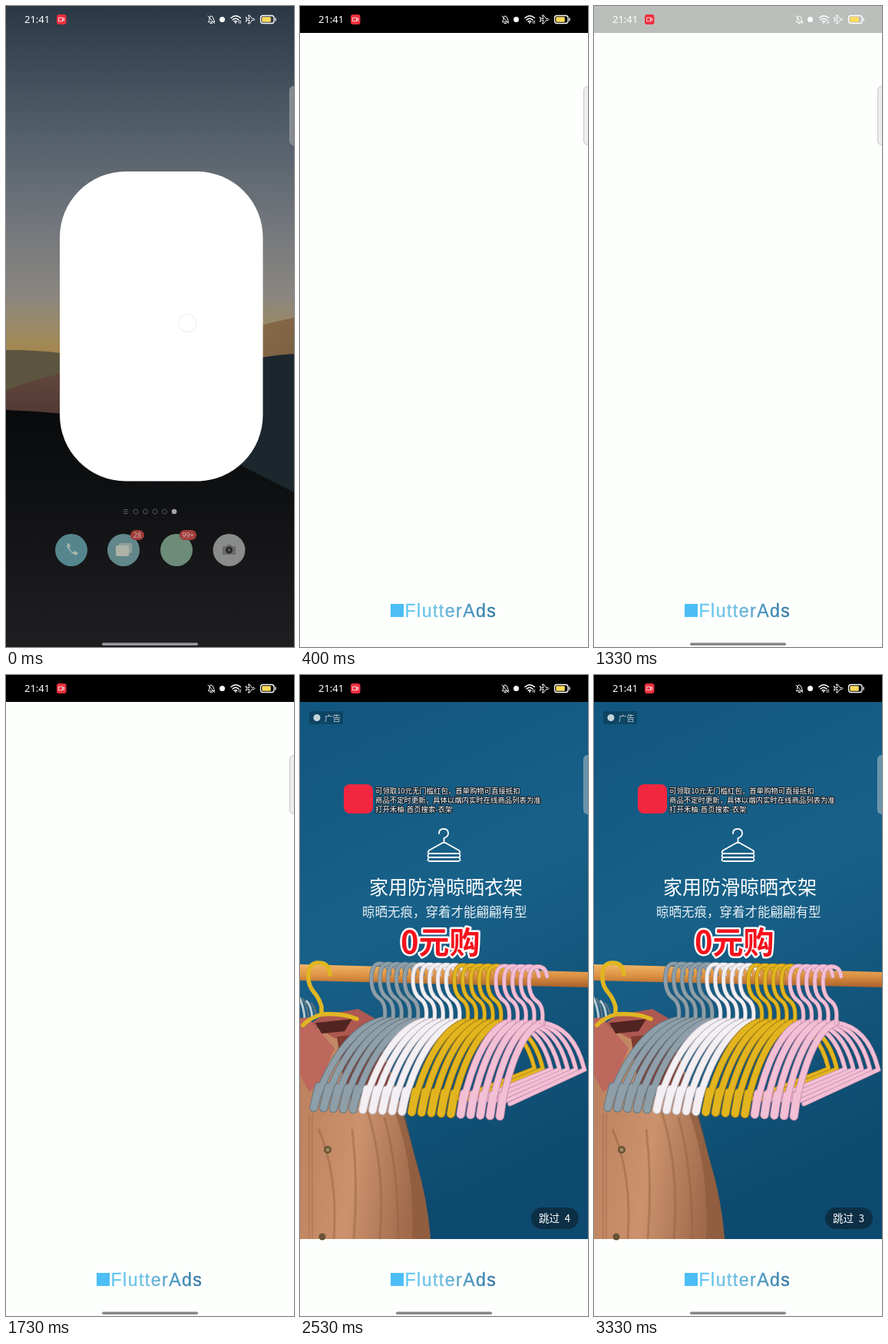
An HTML page for the animation above (3390 ms loop, 375x833 px).

```html
<!DOCTYPE html>
<html lang="zh">
<head>
<meta charset="utf-8">
<title>Splash ad</title>
<style>
html, body { margin: 0; width: 100%; height: 100%; overflow: hidden; background: #000; }
svg { display: block; width: 375px; height: 833px; }
text { font-family: "Noto Sans CJK SC", "Noto Sans", sans-serif; white-space: pre; }
.latin { font-family: "Noto Sans", sans-serif; }
.brand { font: 23px "Liberation Sans", Arial, sans-serif; letter-spacing: 1.5px; }
</style>
</head>
<body>
<svg viewBox="0 0 375 833" xmlns="http://www.w3.org/2000/svg">
<defs>
  <linearGradient id="sky" x2="0" y2="1">
    <stop offset="0" stop-color="#2b3745"/><stop offset=".3" stop-color="#4c5a66"/>
    <stop offset=".6" stop-color="#72767c"/><stop offset=".8" stop-color="#8a8680"/>
    <stop offset=".92" stop-color="#a08a5c"/><stop offset="1" stop-color="#a98040"/>
  </linearGradient>
  <linearGradient id="ground" x2="0" y2="1"><stop offset="0" stop-color="#090a0b"/><stop offset=".4" stop-color="#101113"/><stop offset="1" stop-color="#1f1f22"/></linearGradient>
  <linearGradient id="ochre" x2="1" y2="1"><stop offset="0" stop-color="#93774b"/><stop offset="1" stop-color="#705440"/></linearGradient>
  <linearGradient id="maroon" x2="0" y2="1"><stop offset="0" stop-color="#65493e"/><stop offset="1" stop-color="#49322f"/></linearGradient>
  <linearGradient id="wall" x2=".25" y2="1">
    <stop offset="0" stop-color="#11567e"/><stop offset=".45" stop-color="#186189"/><stop offset="1" stop-color="#0e4a6f"/>
  </linearGradient>
  <linearGradient id="cloth" x2="1" y2=".25">
    <stop offset="0" stop-color="#ba7f5c"/><stop offset=".55" stop-color="#cb926d"/><stop offset="1" stop-color="#a06a4b"/>
  </linearGradient>
  <linearGradient id="wood" x2="0" y2="1"><stop offset="0" stop-color="#f0b568"/><stop offset=".5" stop-color="#dc9142"/><stop offset="1" stop-color="#a9602b"/></linearGradient>
  <linearGradient id="ink" gradientUnits="userSpaceOnUse" x1="137" x2="257">
    <stop offset="0" stop-color="#62c8f4"/><stop offset=".35" stop-color="#74c2e4"/><stop offset="1" stop-color="#2d749f"/>
  </linearGradient>
</defs>

<g id="home">
  <rect width="375" height="470" fill="url(#sky)"/>
  <path d="M240 445Q310 418 375 405V560H240Z" fill="url(#ochre)"/>
  <path d="M0 447Q60 446 140 462V560H0Z" fill="#5c553f"/>
  <path d="M0 500Q50 478 140 465V560H0Z" fill="url(#maroon)"/>
  <path d="M200 495Q290 458 375 452V650H200Z" fill="#1b262d"/>
  <path d="M0 525Q180 530 306 597L375 632V833H0Z" fill="url(#ground)"/>
  <g fill="none" stroke="#56585a"><path d="M153 654.500h6M153 657h6M153 659.500h6"/><g id="dots"></g></g>
  <circle cx="219" cy="657" r="3.300" fill="#a5a6a7"/>
  <circle cx="85" cy="707" r="21" fill="#55868e"/>
  <path d="M80 699Q78 702 82 707T91 714L94 711L90 708L87 710Q84 708 82 704L84 702L82 698Z" fill="#a9b3ad"/>
  <circle cx="153" cy="707" r="21" fill="#61878a"/>
  <rect x="147" y="698" width="17" height="13" rx="2" fill="#8f9f9b"/>
  <rect x="143" y="701" width="17" height="14" rx="2" fill="#adb2a6"/>
  <circle cx="222" cy="707" r="21" fill="#6c8b78"/>
  <circle cx="290.500" cy="707" r="21" fill="#8a8b8b"/>
  <path d="M282 702h5l1-2h5l1 2h5v11h-17Z" fill="#696969"/>
  <circle cx="290.500" cy="707" r="4.500" fill="#252729"/><circle cx="290.500" cy="707" r="1.800" fill="#705b55"/>
  <rect x="162" y="681" width="18" height="13" rx="6.500" fill="#a03b38"/>
  <rect x="226" y="681" width="22" height="13" rx="6.500" fill="#a03b38"/>
  <g class="latin" font-size="9" fill="#d3b3b0" text-anchor="middle"><text class="latin" x="171" y="691">28</text><text class="latin" x="237" y="691">99+</text></g>
  <rect id="dim" width="375" height="833" fill="#000"/>
</g>

<rect id="win" fill="#fff"/>
<circle id="spot" fill="none" stroke="#f2f2f2" stroke-width="1.500"/>

<g id="app">
  <rect width="375" height="833" fill="#fdfffd"/>
  <g id="ad">
    <rect y="35" width="375" height="698" fill="url(#wall)"/>
    <g id="stripes" fill="none" stroke-width="3"></g>
    <path d="M0 376L375 386V406L0 397Z" fill="url(#wood)"/>
    <path d="M0 478L28 455L60 446L104 470L128 548L150 628Q166 680 170 733H0Z" fill="url(#cloth)"/>
    <path d="M134 560L150 628Q166 680 170 733H146Q150 640 124 570Z" fill="#865437" opacity=".55"/>
    <path d="M24 590Q50 650 44 733M86 560Q112 640 104 733M110 575Q128 640 128 733M68 590Q76 660 70 733" fill="none" stroke="#93603f" stroke-width="3" opacity=".45"/>
    <path d="M12 570V733M16 570V733" stroke="#9a6548" opacity=".7"/>
    <path d="M14 453L30 442L76 434L104 450L92 482L45 472Z" fill="#ad5850"/>
    <path d="M20 452L68 447L58 463L28 466Z" fill="#512421"/>
    <path d="M0 446L10 445L45 485L26 530L12 542L0 520Z" fill="#bd675d"/>
    <path d="M48 470L100 464L124 540L60 550Z" fill="#823b30"/>
    <circle cx="36" cy="617" r="5" fill="#665236"/><circle cx="36" cy="617" r="2.500" fill="#a28b5d"/>
    <circle cx="29" cy="730" r="4.500" fill="#665236"/>
    <path d="M39 389Q38 374 24 374T11 393Q11 404 18 412T28 431V441Q12 446 4 455M28 441Q56 439 74 447" fill="none" stroke="#e0b622" stroke-width="5.500" stroke-linecap="round"/>
    <g id="hangers" fill="none" stroke-linecap="round"></g>
    <rect x="12" y="47" width="44" height="17" rx="3" fill="#000" opacity=".22"/>
    <circle cx="22" cy="55.500" r="4.500" fill="#c4d2da"/>
    <text x="32" y="59.500" font-size="10.500" fill="#c4d2da">广告</text>
    <rect x="57" y="142" width="38" height="38" rx="8" fill="#f3263f"/>
    <g font-size="9.400" fill="#fff" stroke="#18222b" stroke-width="2" stroke-linejoin="round" paint-order="stroke">
      <text x="98" y="153.500">可领取10元无门槛红包，首单购物可直接抵扣</text>
      <text x="98" y="165.500">商品不定时更新，具体以端内实时在线商品列表为准</text>
      <text x="98" y="177.500">打开禾柚-首页搜索-衣架</text>
    </g>
    <path d="M181 206Q181 200 187 200T193 206Q193 210 187.500 212V217L207 228Q211 232 205 232H170Q164 232 168 228L187.500 217M168 232Q164 237 170 237H205Q211 237 207 232M168 237Q164 242 170 242H205Q211 242 207 237" fill="none" stroke="#fff" stroke-width="1.800" stroke-linecap="round"/>
    <text x="90" y="284.500" font-size="25" fill="#fff">家用防滑晾晒衣架</text>
    <text x="81" y="314" font-size="16.500" fill="#e9f1f5">晾晒无痕，穿着才能翩翩有型</text>
    <text x="131" y="362" font-size="40" font-weight="700" fill="#f5121c" stroke="#fff" stroke-width="5" stroke-linejoin="round" paint-order="stroke">0元购</text>
    <rect x="301" y="692" width="62" height="28" rx="14" fill="#0b2638" opacity=".75"/>
    <text x="311" y="711" font-size="13.500" fill="#fff">跳过</text>
    <text id="count" x="344.500" y="711" font-size="13.500" fill="#fff"></text>
  </g>
  <rect x="118" y="777" width="17" height="17" fill="#4dbdf5"/>
  <text class="brand" style="font-family:'Liberation Sans',Arial,sans-serif" x="136.500" y="794" fill="url(#ink)" stroke="url(#ink)" stroke-width=".4">FlutterAds</text>
  <rect id="bar" width="375" height="35"/>
</g>

<rect id="tab" x="369.500" y="104.500" width="14" height="76" rx="5"/>
<rect id="pill" x="125" y="827.500" width="125" height="3.500" rx="1.750"/>

<g id="status" fill="none" stroke="#fff" stroke-width="1.200" stroke-linecap="round" stroke-linejoin="round">
  <text class="latin" x="24" y="22" font-size="13" fill="#fff" stroke="none">21:41</text>
  <rect x="66" y="11" width="12.500" height="13" rx="3" fill="#ee2f3f" stroke="none"/>
  <path d="M69 15.200h4.500v4.600H69ZM73.500 17l2.200-1.300v3.600l-2.200-1.300" stroke-width=".8"/>
  <path d="M263.500 20.500Q265 19 265 16T267 13T270 16T271.500 20.500ZM266 22.500h2.500M263 13L271.500 22.500" stroke-width="1"/>
  <circle cx="281.500" cy="17.500" r="3.500" fill="#fff" stroke="none"/>
  <path d="M293 15.500Q299 10 305.500 15.500M295 18Q299 14.500 303 18M297.200 20.200Q299 18.800 300.800 20.200" stroke-width="1.500"/>
  <circle cx="299" cy="21.700" r="1" fill="#fff" stroke="none"/>
  <path d="M303.500 19v3.500M305.500 19v3.500" stroke-width=".8"/>
  <path d="M312.500 14.500L314.500 16.500H317L315.500 12H317L320.500 16.500H323Q325 17.500 323 18.500H320.500L317 23H315.500L317 18.500H314.500L312.500 20.500L313.300 17.500Z" stroke-width="1"/>
  <rect x="331.500" y="12.500" width="17.500" height="10" rx="3" stroke-width="1.300"/>
  <rect x="333.300" y="14.300" width="11.500" height="6.400" rx="1.300" fill="#ffdc5b" stroke="none"/>
  <path d="M351 16v3" stroke-width="1.300"/>
</g>
</svg>
<script>
const LOOP = 3390, STEP = 200 / 3;
const OPEN = 330, GREY = 660, BLACK = 1660, AD = 2130, TICK = 3200;
const $ = id => document.getElementById(id);
const set = (id, attrs) => { for (const k in attrs) $(id).setAttribute(k, attrs[k]); };
const show = (id, on) => set(id, { display: on ? 'inline' : 'none' });
const line = (d, color, w) => `<path d="${d}" stroke="${color}" stroke-width="${w}"/>`;
const mix = (a, b, p) => a + (b - a) * p;

$('dots').innerHTML = [169, 181.5, 194, 206.5].map(x => `<circle cx="${x}" cy="657" r="3"/>`).join('');
$('stripes').innerHTML = [0, 1, 2, 3].map(i =>
  line(`M${i * 5 - 2} ${417 + i * 3}Q${i * 5 + 5} 430 ${i * 5 + 6} 446`, i % 2 ? '#56717e' : '#bdcbd0', 3)).join('');

// Five hangers per colour: face and shaded edge.
const tones = [['#8e9fa9', '#647681'], ['#f3eff2', '#b9b3bc'], ['#e2b51f', '#a87e12'], ['#f2bfd5', '#c98ca9']];

function hanger(i) {
  const [face, edge] = tones[Math.floor(i / 5)];
  const x = 104 + 10.8 * i, y = 375 + i * 0.2;   // top of the hook
  const nx = x + 6, ny = y + 73;                 // neck
  const ex = 18 + 12.75 * i, ey = 562 + i * 0.6; // lower end of the arm
  const arm = `M${nx} ${ny}C${mix(nx, ex, 0.48)} ${ny + 8} ${mix(nx, ex, 0.82)} ${ny + 62} ${ex} ${ey}`;
  const tip = `M${mix(nx, ex, 0.93)} ${ey - 27}L${ex} ${ey}`;
  const hook = `M${x + 12.5} ${y + 13}Q${x + 11} ${y} ${x} ${y}T${x - 11} ${y + 20}Q${x - 11} ${y + 38} ${x - 1} ${y + 45}T${nx} ${ny}`;
  let s = '';
  if (i > 12) {
    const rx = nx + 55, ry = ny + 61;
    const far = `M${nx} ${ny}Q${nx + 42} ${ny + 6} ${rx} ${ry}L${ex + 13} ${ey - 16}`;
    s += line(far, edge, 6) + line(far, face, 4.5);
  }
  return s + line(arm, edge, 9.5) + line(tip, edge, 11.5) + line(arm, face, 7.5) + line(tip, face, 9.5)
    + line(hook, edge, 5.5) + line(hook, face, 4.2);
}
$('hangers').innerHTML = Array.from({ length: 20 }, (_, i) => hanger(i)).join('');

function draw(t) {
  const held = Math.floor((t + 5) / STEP) * STEP;
  const p = 1 - (1 - Math.min(held / OPEN, 1)) ** 3;
  const x = mix(70, 0, p), y = mix(215, 0, p);
  const inApp = held >= OPEN - 1, adOn = held >= AD - 10, grey = held >= GREY && held < BLACK;

  show('home', !inApp);
  show('win', !inApp);
  show('app', inApp);
  show('ad', adOn);
  set('win', { x, y, width: mix(334.5, 375, p) - x, height: mix(617.5, 833, p) - y, rx: mix(86, 18, p) });
  set('spot', { cx: mix(236, 187.5, p), cy: mix(412, 416, p), r: 11.5, opacity: Math.max(0, 1 - held / 130) });
  show('spot', held < 130);
  set('dim', { opacity: 0.2 * p });
  set('bar', { fill: grey ? '#bbbfbb' : '#000' });
  set('tab', adOn ? { fill: '#6b93aa', stroke: '#7ba0b4' }
    : inApp ? { fill: '#ededed', stroke: '#c6c7c6' } : { fill: '#858a8e', stroke: '#94989b' });
  set('pill', { fill: inApp ? '#86868b' : '#9a9a9c' });
  show('pill', !inApp || held >= GREY);
  $('count').textContent = held < TICK - 5 ? '4' : '3';
}

function loop() {
  draw(performance.now() % LOOP);
  requestAnimationFrame(loop);
}
loop();
</script>
</body>
</html>
```
